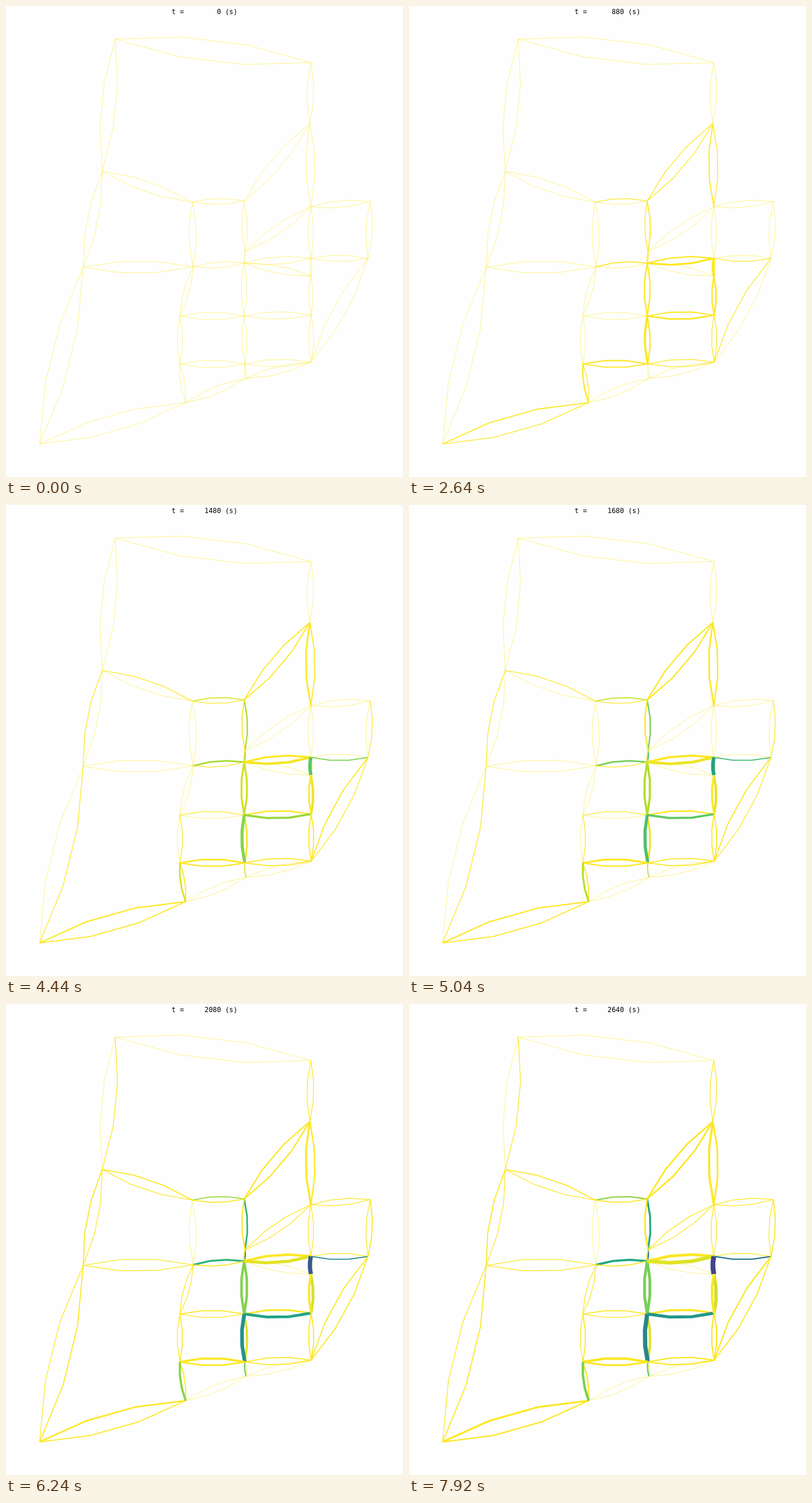
An HTML page that plays this animation: 688 by 815 pixels, repeating every 8 s.

```html
<!DOCTYPE html>
<html lang="en">
<head>
<meta charset="utf-8">
<title>Traffic network</title>
<style>
  html, body { margin: 0; width: 100%; height: 100%; overflow: hidden; background: #fefefe; }
  svg { display: block; width: 100vw; height: 100vh; }
  path { fill: none; stroke-linejoin: round; }
  text { font: 11.85px "DejaVu Sans Mono", monospace; white-space: pre; text-anchor: middle; }
</style>
</head>
<body>
<svg viewBox="0 0 688 815">
  <g id="roads" transform="translate(.3 .3)"></g>
  <text id="clock" x="344" y="14"></text>
</svg>
<script>
const LOOP = 8000, STEP = 120, LAST = 7920;

const nodes = {
  A: [189, 57], B: [528, 97.5], C: [166.5, 286], D: [322.5, 339], E: [412.5, 337],
  F: [526.3, 203], G: [528, 347], H: [414, 425], I: [412.5, 444.5], J: [528, 436.3],
  K: [324, 451], L: [133.5, 452], M: [627, 436.5], N: [631, 338], O: [528, 467],
  P: [301, 536.3], Q: [412.5, 536], R: [528.5, 534.5], S: [301, 619], T: [413.5, 619],
  U: [528.7, 616], V: [415.5, 644], W: [311, 686], X: [58, 757.5]
};

// Each road has one lane per direction; a lane bows to the left of its travel.
const roads = 'AB AC BF CD CL DE DK EF EH FG GN NM HG GJ HI KI IQ IJ IO LK KP LX XW ' +
  'PQ PS QR QT JO JM OR MU RU VU TU TV WV ST SW';

// Lanes by the width they reach, in half pixels; all others stay at 1.
const busy = {
  2: 'AC BF FB DC CL GN NG MN HG GH GJ JG LK KL KP PK XL QP SP JM TV',
  3: 'CD LC ED NM IK LX PQ PS MU VT',
  4: 'DE IH WX JO MJ UM RU UR TU UT SW',
  5: 'EF FE HE FG HI',
  6: 'EH XW QR TS',
  7: 'GF KI',
  8: 'QT RO ST WS',
  9: 'IQ QI IJ',
  10: 'RQ',
  11: 'OR',
  12: 'JI',
  14: 'TQ',
  16: 'OJ'
};

// Share of free speed left at the end on jammed lanes.
const jams = {
  DE: .83, EH: .6, HI: .4, KI: .6, IQ: .79, QI: .79, JI: .95, RQ: .53, QT: .95,
  TQ: .45, OJ: .2, MJ: .4, OR: .93, VT: .7, WS: .8
};

const viridis = ['440154', '482475', '414487', '355f8d', '2a788e', '21918c',
  '22a884', '44bf70', '7ad151', 'bddf26', 'fde725']
  .map(h => [0, 2, 4].map(i => parseInt(h.slice(i, i + 2), 16)));

const layer = document.getElementById('roads');
const clock = document.getElementById('clock');
const mix = (a, b, p) => a + (b - a) * p;

function smooth(from, to, x) {
  const p = Math.min(1, Math.max(0, (x - from) / (to - from)));
  return p * p * (3 - 2 * p);
}

function makeLane(name) {
  const [a, b] = [...name].map(n => nodes[n]);
  const dx = b[0] - a[0], dy = b[1] - a[1], bend = 0.05;
  const at = p => [a[0] + dx * p + dy * bend, a[1] + dy * p - dx * bend];
  const path = document.createElementNS('http://www.w3.org/2000/svg', 'path');
  path.setAttribute('d', 'M' + [a, at(1 / 3), at(2 / 3), b].join('L'));
  layer.append(path);
  const flow = Object.keys(busy).find(w => busy[w].split(' ').includes(name));
  return { path, flow: Number(flow ?? 1), speed: jams[name] ?? 1 };
}

const lanes = roads.split(' ').flatMap(r => [r, r[1] + r[0]]).map(makeLane);

function color(v) {
  const i = Math.min(9, Math.floor(v * 10)), p = v * 10 - i;
  return `rgb(${viridis[i].map((c, k) => Math.round(mix(c, viridis[i + 1][k], p)))})`;
}

function draw(ms) {
  const step = Math.floor(ms / STEP), p = step * STEP / LAST;
  clock.textContent = `t = ${String(step * 40).padStart(8, '\u00a0')} (s)`;
  const growth = p ** 0.65, jam = smooth(0.35, 0.9, p);
  for (const { path, flow, speed } of lanes) {
    const w = Math.max(1, Math.round(flow * growth));
    path.setAttribute('stroke-width', w > 1 ? (w + 0.6) / 2 : 0.55);
    path.setAttribute('stroke', color(mix(1, speed, jam)));
  }
}

const begin = performance.now();
function tick() {
  draw((performance.now() - begin) % LOOP);
  requestAnimationFrame(tick);
}
tick();
</script>
</body>
</html>
```
